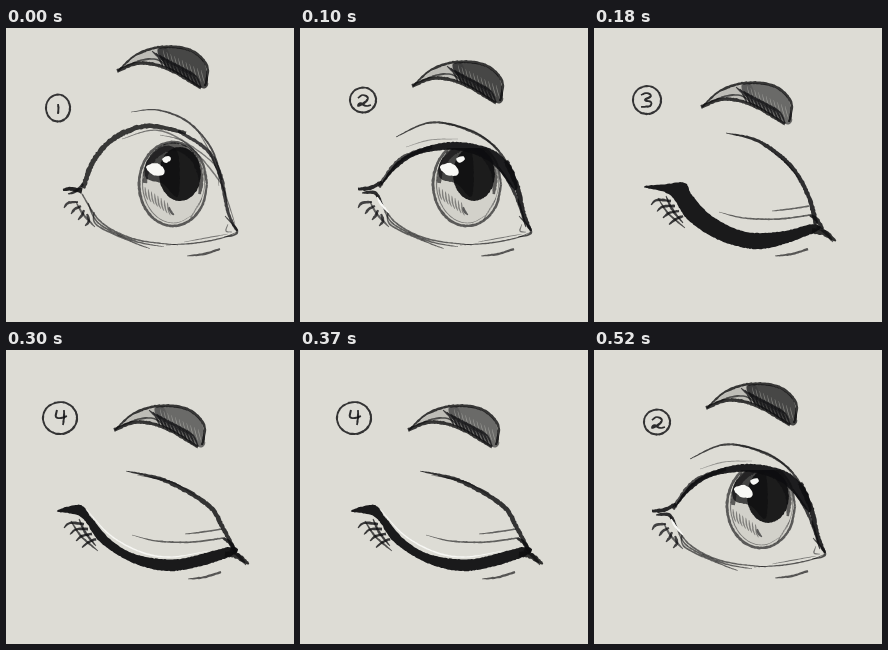
Recreate the animation shown at these times as an HTML page with a canvas. Size 288x294 px, loop 0.6 s.

```html
<!DOCTYPE html>
<html lang="en">
<head>
<meta charset="utf-8">
<title>Blinking eye</title>
<style>
html, body { margin: 0; height: 100%; overflow: hidden; background: #dddcd5; }
canvas { display: block; }
</style>
</head>
<body>
<canvas width="288" height="294"></canvas>
<script>
const ctx = document.querySelector('canvas').getContext('2d');
const PAPER = '#dddcd5', WHITE = '#f8f8f5';
const tone = a => `rgba(14,14,16,${a})`;
let seed = 1;

function jitter(n) {
  seed = seed * 16807 % 2147483647;
  return (seed / 2147483647 * 2 - 1) * n;
}

// Smooth curve through the points of "x y x y ..."
function curve(text, closed) {
  const n = text.trim().split(/\s+/).map(Number), p = [], out = [];
  for (let i = 0; i < n.length; i += 2) p.push([n[i], n[i + 1]]);
  const last = p.length - 1;
  const at = i => closed ? p[(i + p.length) % p.length] : p[Math.max(0, Math.min(last, i))];
  for (let i = 0; i < (closed ? p.length : last); i++) {
    const [a, b, c, d] = [at(i - 1), at(i), at(i + 1), at(i + 2)];
    const steps = Math.max(2, Math.ceil(Math.hypot(c[0] - b[0], c[1] - b[1]) / 1.5));
    const mix = (j, t) => {
      const v1 = c[j] - a[j];
      const v2 = 2 * a[j] - 5 * b[j] + 4 * c[j] - d[j];
      const v3 = 3 * (b[j] - c[j]) + d[j] - a[j];
      return b[j] + t * (v1 + t * (v2 + t * v3)) / 2;
    };
    for (let k = 0; k < steps; k++) out.push([mix(0, k / steps), mix(1, k / steps)]);
  }
  if (!closed) out.push(p[last]);
  return out;
}

function fill(pts, color) {
  ctx.fillStyle = color;
  ctx.beginPath();
  pts.forEach(p => ctx.lineTo(p[0], p[1]));
  ctx.fill();
}

// Rough brush stroke; head and tail are the end widths relative to w
function ink(text, w, a = .8, head = .3, tail = .3, color = tone(a)) {
  const c = curve(text), left = [], right = [], last = c.length - 1;
  c.forEach(([x, y], i) => {
    const [x0, y0] = c[Math.max(0, i - 1)], [x1, y1] = c[Math.min(last, i + 1)];
    const len = Math.hypot(x1 - x0, y1 - y0) || 1, u = 2 * i / last - 1;
    const r = w / 2 * (1 - (1 - (u < 0 ? head : tail)) * u * u);
    const nx = (y0 - y1) / len * r, ny = (x1 - x0) / len * r;
    const l = 1 + jitter(.2), k = 1 + jitter(.2);
    left.push([x + nx * l, y + ny * l]);
    right.unshift([x - nx * k, y - ny * k]);
  });
  fill(left.concat(right), color);
}

function shape(text, a, color = tone(a)) {
  fill(curve(text, true).map(([x, y]) => [x + jitter(.3), y + jitter(.3)]), color);
}

function arc(x, y, rx, ry, from = 0, to = 2) {
  let text = '';
  for (let i = 0; i <= 12; i++) {
    const t = (from + (to - from) * i / 12) * Math.PI;
    text += `${x + rx * Math.cos(t)} ${y + ry * Math.sin(t)} `;
  }
  return text;
}

function badge(x, y, rx, ry, ...digit) {
  ink(arc(x, y, rx, ry, -.6, 1.42), 2.1, .82, .9, .9);
  ctx.save();
  ctx.translate(x, y);
  digit.forEach(d => ink(d, 2.1, .85, .8, .8));
  ctx.restore();
}

function brow(dx, dy, dark) {
  ctx.save();
  ctx.translate(dx, dy);
  shape('152 21 178 21 197 33 202 56 195 60 176 48 160 38', dark);
  shape('113 42 138 24 160 20 162 39 136 35', .15);
  ink('112 43 130 27 155 19 184 22 201 38 199 58', 2.8, .8, .5, .9);
  ink('111 43 134 35 162 41 195 60', 3.4, .8, 1, .8);
  ink('116 40 136 32 152 32 163 41', 1.8, .65);
  for (let i = 0; i < 11; i++) {
    const x = 153 + i * 3.8, y = 30 + i * 2;
    ink(`${x - 7} ${y - 7} ${x} ${y} ${x + 4} ${y + 9}`, 2, .75);
    ink(`${x + 4} ${y - 8} ${x + 6} ${y} ${x + 8} ${y + 6}`, .8, 1, .3, .3, 'rgba(221,220,213,.4)');
  }
  ctx.restore();
}

const underMark = () => ink('181 228 198 226 214 221', 2.2, .65, .3, 1);

function iris() {
  shape(arc(167, 156, 34, 42), .05);
  ink(arc(167, 156, 34, 42), 2.8, .62, .8, .8);
  ink(arc(167.5, 155, 31, 40, .3, 2.2), 1.2, .45);
  ink(arc(167, 155, 28, 36, 1, 2.1), 8, .6, .5, .3);
  shape(arc(174, 146, 21, 27), .93);
  shape('141 133 158 118 172 126 172 168 157 156 140 150', .72);
  for (let i = 0; i < 8; i++) {
    const x = 139 + i * 3.2, y = 165 + i * 2.2;
    ink(`${x} ${y - 6} ${x + 1} ${y + 2} ${x + 3} ${y + 7}`, 1.5, .42);
    ink(`${196 - i * 1.5} ${170 + i * 2.5} ${194 - i * 1.5} ${175 + i * 2.5}`, 1, .3);
  }
  ink('163 179 165 184 168 187', 2.6, .6);
  shape('140 139 150 135 158 141 157 147 147 147', 1, WHITE);
  shape('156 131 162 128 165 131 160 135', 1, WHITE);
}

function lowerLid() {
  for (let i = 0; i < 3; i++) {
    const d = i * 1.8;
    ink(`${76 + i * 6} ${166 + i * 9} ${95 - d} ${194 + d} 128 ${211 + d} ${172 - i * 14} ${217 + d}`, 1.7, .6, .8);
  }
  ink('160 217 190 215 216 210 231 204', 1.4, .65);
  ink('178 214 200 210 222 206', 1, .5);
  ink('219 188 231 202 228 207 218 209', 2, .7);
  ink('222 196 220 203 226 204', 1.3, .5);
  for (let i = 0; i < 4; i++) {
    const x = 58 + i * 7, y = 180 + i * 6;
    ink(`${x} ${y} ${x + 4} ${y - 5} ${72 + i * 3} ${174 + i * 4}`, 2.7, .75, .3, .7);
  }
  ink('70 174 77 186 89 199', 2.2, .6);
  underMark();
}

function wideOpen() {
  brow(0, 0, .72);
  badge(52, 80, 12, 13.5, '0 -4 .4 1 0 6');
  iris();
  ink('125 84 152 82 182 94 205 120 216 152', 1.9, .7, .2, .9);
  ink('77 160 88 132 110 109 142 98 180 105', 5.2, .8, .9, .6);
  ink('172 103 200 121 214 146 222 184 231 203', 3.8, .76, .7, .6);
  for (let i = 0; i < 3; i++)
    ink(`${116 + i * 38} ${111 - i * 4} ${156 + i * 25} ${103 + i * 13} ${206 + i * 8} ${134 + i * 20} ${213 + i * 8} ${158 + i * 19}`, 1.5, .5);
  ink('57 162 65 161 76 163', 4, .9, .5, 1.4);
  ink('62 166 70 163 77 156', 2.8, .8, .3, 1);
  lowerLid();
}

function halfOpen() {
  brow(1, 15, .72);
  badge(63, 72, 13, 12.5, '-5 -2 0 -5 5 -2 1 3 -5 6 -3 3 3 6 8 5');
  ctx.save();
  ctx.beginPath();
  ctx.rect(0, 120, 288, 174);
  ctx.clip();
  iris();
  ctx.restore();
  shape('79 160 96 135 122 120 158 114 195 123 214 145 215 162 190 134 155 122 117 127 95 142', .92);
  ink('79 159 100 132 132 119', 4.5, .7, .7, .7);
  ink('206 133 217 158 223 184 231 203', 5, .88, 1, .5);
  ink('199 139 215 166 226 199', 3, .78);
  ink('96 109 128 95 160 99 192 116 214 145', 2.3, .74, .3, .9);
  ink('141 94 175 104 200 123', 1.6, .55);
  ink('106 119 130 112 158 111', 1, .35);
  ink('58 161 70 160 82 154', 4, .88, .5, .8);
  ink('62 165 75 165 82 176', 3.5, .85);
  lowerLid();
  ink('77 169 82 177 89 185', 2.5, 1, .3, .3, WHITE);
}

// Parts common to both closed poses
function closedEye() {
  ink('216 187 223 192 229 201', 4, .85, .5, .5);
  ink('218 203 230 205 242 213', 5.5, .84, 1, .2);
  ink('223 199 231 204 239 214', 3.2, .7, 1, .2);
  ink('125 184 150 190 185 191 216 187', 1.7, .6, .2, 1);
  ink('178 183 196 181 215 178', 1.6, .58, .3, 1);
  for (let i = 0; i < 4; i++) {
    const x = 57 + i * 6, y = 177 + i * 6.5;
    ink(`${x} ${y} ${x + 6} ${y - 5} ${77 + i * 4} ${173 + i * 5}`, 2.5, .8, .4, 1);
  }
  ink('64 170 74 185 91 200', 2, .7);
  ink('72 168 78 181 89 195', 2.5, .75);
  underMark();
}

function closing() {
  brow(-4, 36, .55);
  badge(53, 72, 14, 14, '-6 -5 0 -7 4 -4 -2 0 4 2 3 6 -6 7');
  shape('50 159 72 156 91 155 98 167 118 188 152 204 190 203 219 196 225 202 190 216 160 221 125 212 94 192 76 167', .94);
  ink('132 105 164 113 196 137 214 167 222 196', 4.2, .84, .1, 1.1);
  ink('176 122 193 136 206 152', 1.5, .6);
  closedEye();
}

function shut() {
  brow(-3, 37, .55);
  badge(54, 68, 17, 16, '-3 -8 -4 -1 1 0 7 -2', '4 -8 4 -1 3 7');
  shape('51 161 74 155 85 167 105 190 132 205 172 209 224 197 229 204 195 216 160 221 125 212 94 192 75 167', .94);
  ink('81 160 104 185 135 202 165 207 202 201', 1.5, 1, .3, .3, WHITE);
  ink('120 121 160 131 202 155 218 180 230 203', 4.5, .82, .1, .8);
  ink('131 125 165 132 192 147', 1.4, .55);
  ctx.save();
  ctx.translate(1, 1);
  closedEye();
  ctx.restore();
}

const poses = [[100, wideOpen], [180, halfOpen], [300, closing], [420, shut], [520, closing], [600, halfOpen]];
const start = performance.now();
let shown;

function tick() {
  const time = (performance.now() - start) % 600;
  const pose = poses.find(([end]) => time < end)[1];
  if (pose !== shown) {
    shown = pose;
    seed = 7;
    ctx.fillStyle = PAPER;
    ctx.fillRect(0, 0, 288, 294);
    pose();
  }
  requestAnimationFrame(tick);
}
tick();
</script>
</body>
</html>
```
